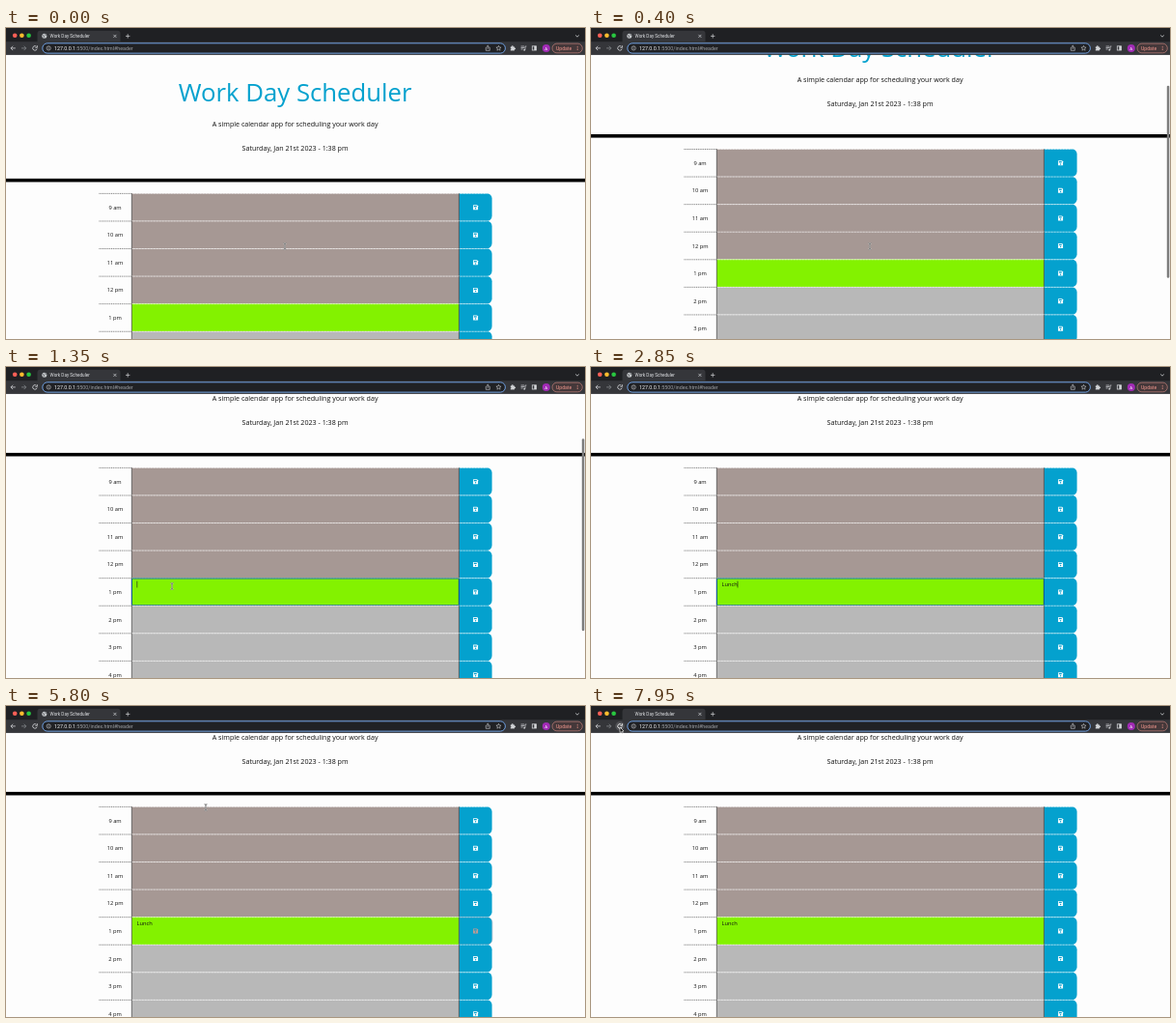
An HTML page with a canvas for the animation above (8000 ms loop, 600 px wide and 322 px high).

```html
<!DOCTYPE html>
<html lang="en">
<head>
<meta charset="utf-8">
<title>Work Day Scheduler</title>
<style>
html, body { margin: 0; width: 100%; height: 100%; overflow: hidden; background: #fdfdfd; }
canvas { display: block; width: 600px; height: 322px; }
</style>
</head>
<body>
<canvas id="stage"></canvas>
<script>
const W = 600, H = 322, LOOP = 8000;
const canvas = document.getElementById('stage');
const ratio = Math.max(1, window.devicePixelRatio || 1);
canvas.width = W * ratio;
canvas.height = H * ratio;
const ctx = canvas.getContext('2d');

const PAGE = '"Open Sans", "Noto Sans", sans-serif';
const UI = 'Roboto, Inter, sans-serif';
const BLUE = '#04a1ce', PAST = '#a69894', NOW = '#83f200', FUTURE = '#b8b8b8';
const HOURS = ['9 am', '10 am', '11 am', '12 pm', '1 pm', '2 pm', '3 pm', '4 pm', '5 pm'];
const ACTIVE = 4;
const LEFT = 96.4, TEXT_X = 130.3, SAVE_X = 469.6, RIGHT = 503.6;
const TOP = 171.2, ROW = 28.57;

const CLICK_TEXT = 1200, TYPE_START = 1900, TYPE_STEP = 200, MOVE_AGAIN = 3500;
const HOVER_SAVE = 4850, CLICK_SAVE = 5050, RELOAD = 7000;

// time, x, y
const PATH = [
  [0, 289, 226], [850, 289, 226], [1200, 172, 227], [3500, 172, 227], [4250, 309, 286],
  [4450, 309, 286], [4950, 487, 235], [5350, 487, 235], [5800, 207, 105], [6250, 30, 22]
];

const clamp = v => Math.max(0, Math.min(1, v));
const smooth = u => u * u * (3 - 2 * u);

function pointer(t) {
  for (let i = 1; i < PATH.length; i++) {
    const [t0, x0, y0] = PATH[i - 1], [t1, x1, y1] = PATH[i];
    if (t < t1) {
      const u = smooth((t - t0) / (t1 - t0));
      return [x0 + (x1 - x0) * u, y0 + (y1 - y0) * u];
    }
  }
  return PATH[PATH.length - 1].slice(1);
}

function rect(x, y, w, h, color) {
  ctx.fillStyle = color;
  ctx.fillRect(x, y, w, h);
}

function round(x, y, w, h, r) {
  ctx.beginPath();
  ctx.roundRect(x, y, w, h, r);
}

function disc(x, y, r, color) {
  ctx.fillStyle = color;
  ctx.beginPath();
  ctx.arc(x, y, r, 0, Math.PI * 2);
  ctx.fill();
}

function ring(x, y, r, from = 0, to = Math.PI * 2) {
  ctx.beginPath();
  ctx.arc(x, y, r, from, to);
  ctx.stroke();
}

function line(color, width, ...pts) {
  ctx.strokeStyle = color;
  ctx.lineWidth = width;
  ctx.beginPath();
  for (let i = 0; i < pts.length; i += 2) ctx.lineTo(pts[i], pts[i + 1]);
  ctx.stroke();
}

function text(str, x, y, size, color, family = PAGE, align = 'left') {
  ctx.font = `${size}px ${family}`;
  ctx.textAlign = align;
  ctx.fillStyle = color;
  ctx.fillText(str, x, y);
}

function saveIcon(x, y, color, back) {
  ctx.fillStyle = color;
  ctx.beginPath();
  ctx.moveTo(x - 2.5, y - 2.5);
  ctx.lineTo(x + 1.5, y - 2.5);
  ctx.lineTo(x + 2.5, y - 1.5);
  ctx.lineTo(x + 2.5, y + 2.5);
  ctx.lineTo(x - 2.5, y + 2.5);
  ctx.fill();
  rect(x - 1.7, y - 1.7, 2.9, 1.3, back);
  disc(x, y + 1.1, 0.75, back);
}

function drawRow(i, y, t) {
  const active = i === ACTIVE;
  const fill = i < ACTIVE ? PAST : active ? NOW : FUTURE;
  const mid = y + ROW / 2;
  ctx.setLineDash([1.1, 0.7]);
  line('#555', 0.7, LEFT, y + 0.2, TEXT_X, y + 0.2);
  ctx.setLineDash([]);
  text(HOURS[i], (LEFT + TEXT_X) / 2 - 0.3, mid + 2.2, 5.71, '#111', PAGE, 'center');

  rect(TEXT_X, y, SAVE_X - TEXT_X, ROW, fill);
  ctx.fillStyle = BLUE;
  round(SAVE_X, y, RIGHT - SAVE_X, ROW, [0, 5.3, 5.3, 0]);
  ctx.fill();
  ctx.setLineDash([1.1, 0.4]);
  line('rgba(255,255,255,.9)', 0.8, TEXT_X, y + 0.2, RIGHT - 5, y + 0.2);
  ctx.setLineDash([]);
  line('#3c3a3a', 0.7, TEXT_X, y, TEXT_X, y + ROW);
  line('#3c3a3a', 0.7, SAVE_X - 0.2, y, SAVE_X - 0.2, y + ROW);

  const held = active && t >= CLICK_SAVE && t < RELOAD;
  const warm = active && t >= HOVER_SAVE && t < RELOAD;
  if (held) {
    ctx.strokeStyle = 'rgba(90,130,160,.4)';
    ctx.lineWidth = 1;
    round(SAVE_X + 0.3, y + 0.3, RIGHT - SAVE_X, ROW - 0.4, [0, 5.3, 5.3, 0]);
    ctx.stroke();
  }
  saveIcon(486.6, mid + 0.2, warm ? '#c69a92' : '#fff', BLUE);
  if (active) drawEntry(y, t);
}

function drawEntry(y, t) {
  const count = Math.max(0, Math.min(5, Math.floor((t - TYPE_START) / TYPE_STEP) + 1));
  const entry = 'Lunch'.slice(0, count);
  text(entry, 135.6, y + 8.7, 5.71, '#111');
  if (t < CLICK_TEXT || t >= CLICK_SAVE) return;
  ctx.strokeStyle = '#0a5c9c';
  ctx.lineWidth = 1;
  round(TEXT_X + 0.1, y + 0.5, SAVE_X - TEXT_X - 0.3, ROW - 0.8, 0.6);
  ctx.stroke();
  const typedAt = TYPE_START + 4 * TYPE_STEP;
  const busy = t >= TYPE_START && t < typedAt + 500;
  const phase = t < TYPE_START ? t - CLICK_TEXT : t - typedAt;
  if (busy || phase % 1000 < 500) {
    ctx.font = `5.71px ${PAGE}`;
    const x = 135.8 + ctx.measureText(entry).width;
    line('#111', 0.6, x, y + 3.2, x, y + 10);
  }
}

function drawPage(t) {
  const u = clamp((t - 50) / 800);
  const scroll = 67 * (1 - (1 - u) * (1 - u));
  rect(0, 0, W, H, '#fdfdfd');
  text('Work Day Scheduler', 299.6, 76.3 - scroll, 25.71, BLUE, PAGE, 'center');
  text('A simple calendar app for scheduling your work day', 299.6, 102.3 - scroll, 7.14, '#111', PAGE, 'center');
  text('Saturday, Jan 21st 2023 - 1:38 pm', 299.6, 126.5 - scroll, 7.14, '#111', PAGE, 'center');
  rect(0, 155.9 - scroll, W, 3.57, '#000');
  HOURS.forEach((_, i) => drawRow(i, TOP + i * ROW - scroll, t));

  const alpha = clamp((t - 50) / 50) * clamp((1650 - t) / 200);
  if (alpha > 0) {
    ctx.globalAlpha = alpha;
    ctx.fillStyle = '#7d7d7d';
    round(596.8, 28 + scroll * 0.69, 2.5, 199, 1.2);
    ctx.fill();
    ctx.globalAlpha = 1;
  }
}

function star(x, y, r) {
  const pts = [];
  for (let i = 0; i <= 10; i++) {
    const a = -Math.PI / 2 + i * Math.PI / 5, d = i % 2 ? r * 0.45 : r;
    pts.push(x + d * Math.cos(a), y + d * Math.sin(a));
  }
  line('#c8cacd', 0.6, ...pts);
}

function drawTabs(t) {
  rect(0, 0, W, 15, '#1f2023');
  ['#fe5f57', '#febc2e', '#28c840'].forEach((c, i) => disc(9.2 + i * 7.2, 7.8, 2.3, c));
  ctx.fillStyle = '#35363a';
  round(32.5, 2.8, 86, 13, [3, 3, 0, 0]);
  ctx.fill();
  if (t < RELOAD) {
    disc(39.8, 8.3, 2.5, '#c4c7ca');
    line('#4b4d51', 0.7, 38, 7.5, 39.5, 8.2, 39.2, 9.8);
    line('#4b4d51', 0.7, 40.5, 6.4, 41.6, 8.1);
  }
  text('Work Day Scheduler', 45.6, 10, 4.65, '#e3e5e8', UI);
  line('#d5d7da', 0.7, 111.4, 6.9, 114.4, 9.9);
  line('#d5d7da', 0.7, 114.4, 6.9, 111.4, 9.9);
  line('#d5d7da', 0.7, 124, 8.4, 128.4, 8.4);
  line('#d5d7da', 0.7, 126.2, 6.2, 126.2, 10.6);
  line('#d5d7da', 0.8, 590.2, 7.5, 592, 9.2, 593.8, 7.5);
}

function drawToolbar(t) {
  rect(0, 14.2, W, 13.7, '#35363a');
  const light = '#d3d5d8';
  line(light, 0.8, 9.8, 20.9, 5, 20.9);
  line(light, 0.8, 7.2, 18.7, 5, 20.9, 7.2, 23.1);
  line('#85888c', 0.8, 16, 20.9, 20.8, 20.9);
  line('#85888c', 0.8, 18.6, 18.7, 20.8, 20.9, 18.6, 23.1);

  const over = t >= 6150;
  if (over) disc(30, 20.9, 4.8, '#505155');
  ctx.strokeStyle = over ? '#fff' : light;
  ctx.lineWidth = 0.8;
  ring(30, 20.9, 2.3, 0.3, 5.4);
  line(ctx.strokeStyle, 0.8, 32.4, 18.2, 32.4, 20.3, 30.3, 20.3);

  ctx.fillStyle = '#202124';
  round(37.8, 15.8, 479.6, 10.3, 5.1);
  ctx.fill();
  ctx.strokeStyle = '#6f9fdf';
  ctx.lineWidth = 1;
  ctx.stroke();
  ctx.strokeStyle = light;
  ctx.lineWidth = 0.6;
  ring(44.2, 20.9, 2.1);
  line(light, 0.6, 44.2, 20.5, 44.2, 22);
  rect(43.9, 19.5, 0.6, 0.6, light);
  text('127.0.0.1', 50, 22.8, 5.3, '#f1f2f4', UI);
  text(':5500/index.html#header', 50 + ctx.measureText('127.0.0.1').width, 22.8, 5.3, '#9da0a5', UI);

  line(light, 0.6, 498.2, 20.2, 497.3, 20.2, 497.3, 23.3, 501.3, 23.3, 501.3, 20.2, 500.4, 20.2);
  line(light, 0.6, 499.3, 21.8, 499.3, 18.3);
  line(light, 0.6, 498, 19.4, 499.3, 18.2, 500.6, 19.4);
  star(510.5, 21, 2.7);

  rect(522.8, 19.4, 4.1, 4, light);
  disc(524.8, 19.1, 0.9, light);
  disc(527.2, 21.3, 0.9, light);
  disc(522.8, 21.5, 0.7, '#35363a');
  for (let i = 0; i < 3; i++) line(light, 0.7, 533.6, 19 + i * 1.5, i < 2 ? 537.2 : 535.6, 19 + i * 1.5);
  line(light, 0.7, 539.4, 19, 538, 19, 538, 22.6);
  disc(537.2, 22.7, 0.9, light);
  ctx.strokeStyle = light;
  ctx.lineWidth = 0.8;
  ctx.strokeRect(545.3, 18.8, 4.1, 4.2);
  rect(547.3, 18.8, 2.1, 4.2, light);

  disc(559.8, 20.9, 4, '#a12bb5');
  text('A', 559.8, 22.5, 4.4, '#fff', UI, 'center');
  ctx.fillStyle = '#45383a';
  round(566, 16.1, 31.3, 9.7, 4.8);
  ctx.fill();
  ctx.strokeStyle = '#d98f86';
  ctx.lineWidth = 0.6;
  ctx.stroke();
  text('Update', 570, 22.7, 5.1, '#f0978d', UI);
  for (let i = -1; i <= 1; i++) disc(592.2, 20.9 + i * 1.7, 0.5, '#f0978d');
}

function beam(x, y) {
  for (const [color, w] of [['rgba(255,255,255,.75)', 1.5], ['#333', 0.7]]) {
    line(color, w, x, y - 2.8, x, y + 2.8);
    line(color, w, x - 1.4, y - 3.3, x, y - 2.8, x + 1.4, y - 3.3);
    line(color, w, x - 1.4, y + 3.3, x, y + 2.8, x + 1.4, y + 3.3);
  }
}

function shape(fill, pts) {
  ctx.beginPath();
  for (let i = 0; i < pts.length; i += 2) ctx.lineTo(pts[i], pts[i + 1]);
  ctx.closePath();
  ctx.fillStyle = fill;
  ctx.fill();
  ctx.strokeStyle = '#fff';
  ctx.lineWidth = 0.6;
  ctx.stroke();
}

function drawPointer(t) {
  if (t >= TYPE_START && t < MOVE_AGAIN) return;
  const [x, y] = pointer(t);
  if (y > 103 && x > TEXT_X && x < SAVE_X) return beam(x, y);
  if (y > 103 && x >= SAVE_X && x < RIGHT) {
    return shape('#111', [x - 0.7, y - 2, x + 0.7, y - 2, x + 0.7, y + 0.4, x + 2.9, y + 1,
      x + 2.3, y + 4.8, x - 1, y + 4.8, x - 2.4, y + 2.2, x - 0.7, y + 2.7]);
  }
  shape('#111', [x, y, x, y + 5.6, x + 1.3, y + 4.5, x + 2.2, y + 6.3,
    x + 3.1, y + 5.9, x + 2.3, y + 4.1, x + 4, y + 4]);
}

function draw(t) {
  ctx.setTransform(ratio, 0, 0, ratio, 0, 0);
  drawPage(t);
  drawTabs(t);
  drawToolbar(t);
  drawPointer(t);
}

const start = performance.now();
function tick() {
  draw((performance.now() - start) % LOOP);
  requestAnimationFrame(tick);
}
tick();
</script>
</body>
</html>
```
